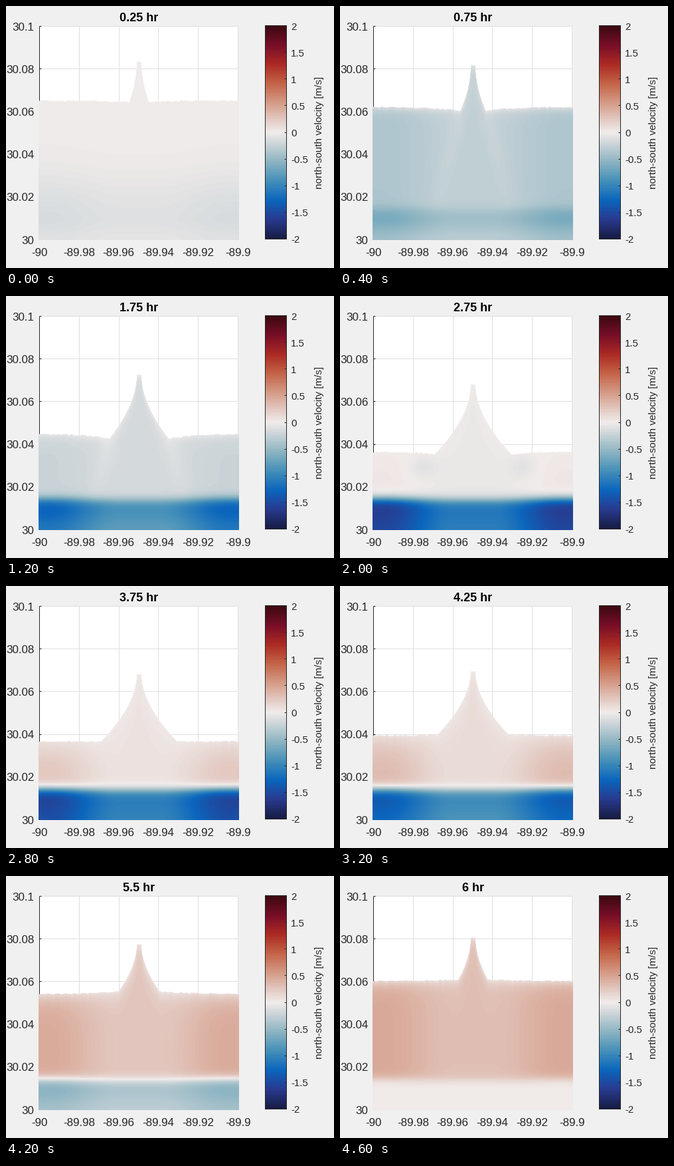
A matplotlib script for the animation above (4.8 s loop, 494 by 394 pixels).

```python
import numpy as np
import matplotlib.pyplot as plt
from matplotlib.animation import FuncAnimation
from matplotlib.colors import LinearSegmentedColormap
from matplotlib.patches import Rectangle

W, H, DPI = 494, 394, 100
FRAMES, INTERVAL = 24, 200
INK, GRID = "#262626", "#dfdfdf"
LEFT, RIGHT, TOP, BOTTOM = 50, 349, 30, 351
BAR_L, BAR_R = 390, 422
MID = 200

plt.rcParams["font.family"] = "Liberation Sans"

COLD = ["#171c42", "#293a8f", "#0b66bd", "#4590b9", "#8eb5c2", "#d2d8db"]
WARM = ["#e6d2cc", "#d59d89", "#c46548", "#ac2b24", "#780e28", "#3c0911"]
stops = np.arange(12) / 11
balance = LinearSegmentedColormap.from_list(
    "balance", [*zip(stops[:6], COLD), (.5, "#f1eceb"), *zip(stops[6:], WARM)])


def smooth(a, b, x):
    u = np.clip((x - a) / (b - a), 0, 1)
    return u * u * (3 - 2 * u)


def bell(x, centre, width):
    return np.exp(-((x - centre) / width) ** 2)


def mix(a, b, u):
    return a + (b - a) * u


X0, X1, Y0, Y1 = 49, 350, 78, 352
dx = np.abs(np.arange(X0, X1) + .5 - MID)
y = (np.arange(Y0, Y1) + .5)[:, None]
side = smooth(30, 135, dx)


def shoreline(phase, ebb, frame):
    """Top of the water per column: a flat bank with a cusp in the middle."""
    bank = 142 + 94 * ebb
    notch = bank + 2 + 6 * np.sin(phase)
    tip = 84 + 50 * ebb
    half = 14 + 44 * ebb
    rise = np.clip((dx - 3) / (half - 3), 0, 1) ** (1 / 1.85)
    out = np.clip((dx - half) / (150 - half), 0, 1)
    rng = np.random.default_rng(frame)
    rough = np.repeat(rng.uniform(-.8, .8, len(dx) // 4 + 1), 4)[:len(dx)]
    flat = mix(bank, notch, np.exp(-3 * out)) + rough
    return np.where(dx < half, mix(tip, notch, rise), flat), notch, half


def field(frame):
    t = (frame + 1) / 4
    # The water falls faster than it rises again
    phase = .945 * (t - .25) + .62 * bell(t, 2.2, 1.3)
    ebb = .5 - .5 * np.cos(phase)
    start = bell(t, .25, .25)
    shore, notch, half = shoreline(phase, ebb, frame)
    depth = np.clip(y - shore, 0, None)

    # Upper water: outflow turning into inflow, slower at the surface
    flow = .48 * np.tanh((t - 2.6) / 1.7) * smooth(.2, .8, t)
    upper = mix((.75 - .3 * ebb) * flow - .06 * ebb, flow, side)
    fade = 6 + 20 * ebb * smooth(1.5, 2.75, t)
    upper = upper * (1 - .75 * np.exp(-depth / fade))
    ray = half + .25 * (y - notch)
    streak = .45 * bell(t, 1.4, .65) * (1 - .6 * smooth(notch, 300, y))
    upper = upper * (1 - streak * bell(dx, ray, 13))
    upper = upper - .08 * bell(t, 2.75, .4) * bell(dx, 75, 22) * bell(y, 257, 18)

    # Lower water: one long outflow pulse, strongest at the sides
    pulse = -1.63 * max(np.sin(np.pi * (t - .15) / 5.85), 0) ** .8
    lower = pulse * mix(.7, 1, side)
    lower = lower * (1 - (.35 - .3 * ebb) * smooth(318, 353, y))
    edge = 305 - 38 * start + 2 * (1 - side)
    below = 1 / (1 + np.exp((edge - y) / (4 + 16 * start)))

    rgba = balance((mix(upper, lower, below) + 2) / 4)
    rgba[..., 3] = np.clip(y - shore + .5, 0, 1)
    return rgba


fig = plt.figure(figsize=(W / DPI, H / DPI), dpi=DPI, facecolor="#f0f0f0")
ax = fig.add_axes([0, 0, 1, 1])
ax.axis("off")


def line(xs, ys, color=INK, z=3):
    ax.plot(xs, ys, color=color, lw=.72, zorder=z, solid_capstyle="butt")


def label(x, base, text, px, **kw):
    kw = {"ha": "center", "va": "baseline", "color": INK, **kw}
    return ax.text(x, base, text, fontsize=px * 72 / DPI, zorder=6, **kw)


# Map axes
ax.add_patch(Rectangle((LEFT, TOP), RIGHT - LEFT, BOTTOM - TOP, fc="white", lw=0))
for i in range(6):
    gx = mix(LEFT, RIGHT, i / 5)
    gy = mix(BOTTOM, TOP, i / 5)
    line([gx, gx], [TOP, BOTTOM], GRID, z=2)
    line([LEFT, RIGHT], [gy, gy], GRID, z=2)
    line([LEFT, LEFT + 3], [gy, gy])
    label(gx, 376, f"{-90 + .02 * i:g}", 17)
    label(42.5, gy + 6.5, f"{30 + .02 * i:g}", 17, ha="right")
line([LEFT, LEFT], [TOP, BOTTOM])

# Colour bar
BAR_T, BAR_B = TOP - 1, BOTTOM - 1
ax.imshow(np.linspace(1, 0, 256)[:, None], cmap=balance, aspect="auto",
          extent=(BAR_L, BAR_R + 1, BAR_B + 1, BAR_T), zorder=2)
ax.add_patch(Rectangle((BAR_L, BAR_T), BAR_R - BAR_L, BAR_B - BAR_T,
                       fill=False, ec=INK, lw=.72, zorder=3))
for i in range(9):
    ty = mix(BAR_T, BAR_B, i / 8)
    line([BAR_R - 3, BAR_R], [ty, ty])
    label(429, ty + 6.5, f"{2 - i / 2:g}", 15, ha="left")
label(471.5, 190, "north-south velocity [m/s]", 15.2, rotation=90, va="center")

title = label(MID, 23, "", 18, weight="bold", color="black")
water = ax.imshow(field(0), extent=(X0, X1, Y1, Y0), aspect="auto",
                  interpolation="nearest", zorder=5)
ax.set_xlim(0, W)
ax.set_ylim(H, 0)


def draw(frame):
    water.set_data(field(frame))
    title.set_text(f"{(frame + 1) / 4:g} hr")
    return water, title


anim = FuncAnimation(fig, draw, frames=FRAMES, interval=INTERVAL, repeat=True,
                     repeat_delay=0)
plt.show()
```
